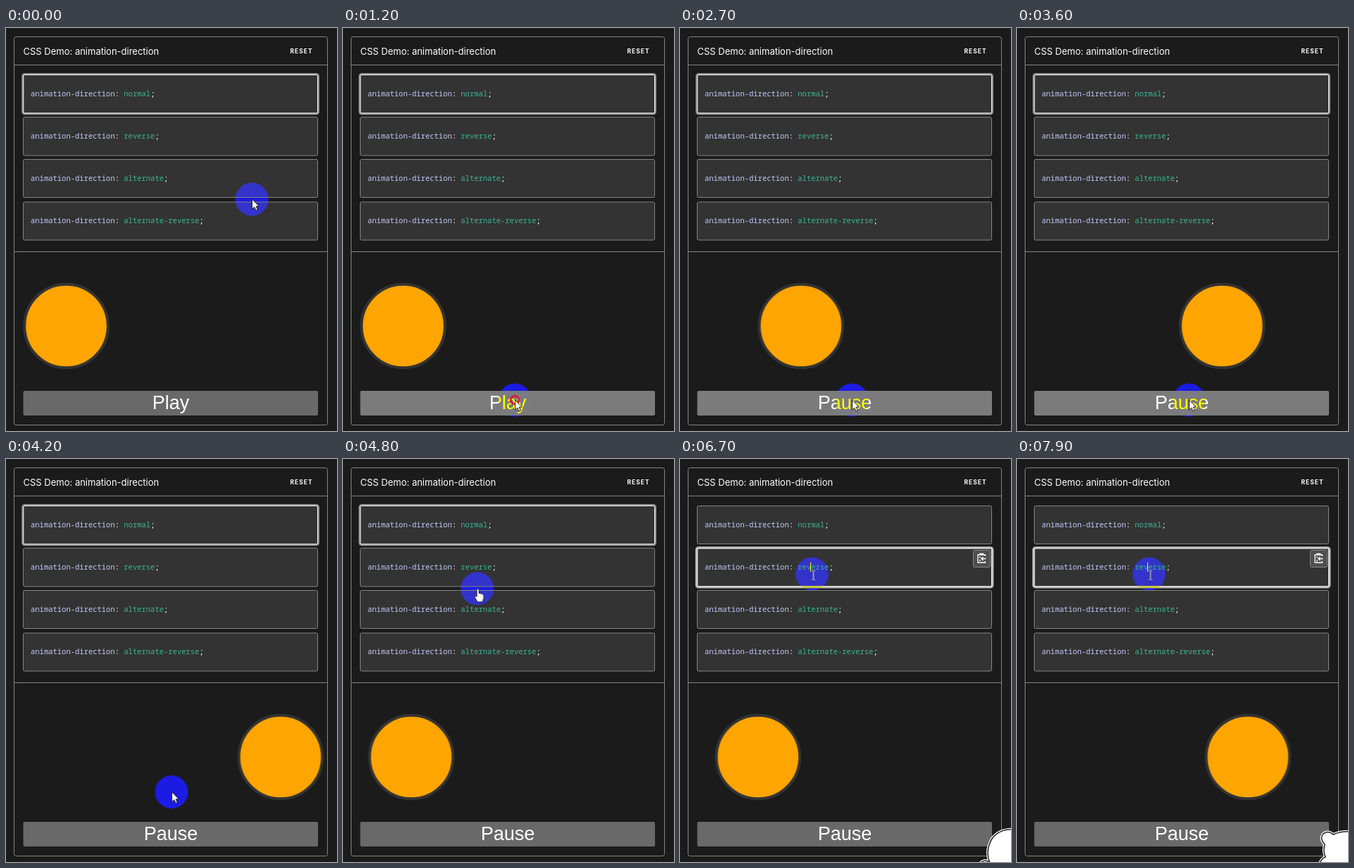
These frames come from a looping animation (470 px wide and 572 px high, 8000 ms). An HTML page:

```html
<!DOCTYPE html>
<html lang="en">
<head>
<meta charset="utf-8">
<title>animation-direction demo</title>
<style>
html, body { margin: 0; width: 100%; height: 100%; overflow: hidden; background: #1b1b1b; }
svg { display: block; width: 470px; height: 572px; }

.title { font: 13px Inter, sans-serif; fill: #fff; }
.reset { font: 700 8.4px Inter, sans-serif; letter-spacing: 1.1px; fill: #fff; }
.code { font: 10.5px "Noto Sans Mono", monospace; fill: #fff; white-space: pre; }
.prop { fill: #c5c8fb; }
.val { fill: #3ab891; }
.play { font: 27px "Liberation Sans", Arial, sans-serif; fill: #fff; text-anchor: middle; }
.line { fill: none; stroke: #858585; }
.choice { fill: #333; stroke: #858585; }
.glow { fill: none; stroke: #929292; stroke-width: 2.5; }
.edge { fill: #333; stroke: #fff; }
.bright { stroke: #bdbdbd; stroke-width: 3; }
.spot { fill: #00f; mix-blend-mode: difference; }

/* everything shares one 8 s clock */
.ball, .track, .hover, .before, .after, .idle, .playing,
.arrow, .hand, .press, .caret, .pet, .dome, .ears {
  animation: 8s linear infinite;
}
.hover, .before, .after, .idle, .playing, .arrow, .hand,
.press, .caret, .dome, .ears { animation-timing-function: step-end; }

/* ease-in slide of 3 s, flipped to reverse by the second click */
.ball { animation-name: slide; }
@keyframes slide {
  0% { transform: translateX(0); }
  17.1% { transform: translateX(0); animation-timing-function: cubic-bezier(.42, 0, 1, 1); }
  54.6% { transform: translateX(335px); animation-timing-function: step-end; }
  54.605% { transform: translateX(0); animation-timing-function: cubic-bezier(.315, 0, .66, .403); }
  67.61% { transform: translateX(56.2px); animation-timing-function: step-end; }
  67.615% { transform: translateX(165.5px); animation-timing-function: cubic-bezier(.302, .502, .681, 1); }
  92.1% { transform: translateX(0); animation-timing-function: step-end; }
  92.105% { transform: translateX(335px); animation-timing-function: cubic-bezier(0, 0, .397, .446); }
  100% { transform: translateX(226.5px); }
}

.track { animation-name: track; }
@keyframes track {
  0%, .6% { transform: translate(349px, 243px); animation-timing-function: ease-in-out; }
  11.3% { transform: translate(242px, 526px); }
  12.5% { transform: translate(244px, 528px); }
  49% { transform: translate(244px, 528px); animation-timing-function: cubic-bezier(.4, 0, .8, .8); }
  58.75% { transform: translate(195px, 226px); }
  60% { transform: translate(190.5px, 184px); animation-timing-function: ease-out; }
  63%, 100% { transform: translate(187.5px, 163px); }
}

.hover { animation-name: hover; }
@keyframes hover { 0%, 50.5%, 100% { fill: #696969; } 10% { fill: #7b7b7b; } }

.before { animation-name: before; }
@keyframes before { 0% { opacity: 1; } 67.61%, 100% { opacity: 0; } }
.after { animation-name: after; }
@keyframes after { 0% { opacity: 0; } 67.61%, 100% { opacity: 1; } }

.idle { animation-name: idle; }
@keyframes idle { 0% { opacity: 1; } 17.1%, 100% { opacity: 0; } }
.playing { animation-name: playing; }
@keyframes playing { 0% { opacity: 0; } 17.1%, 100% { opacity: 1; } }

.arrow { animation-name: arrow; }
@keyframes arrow { 0%, 4% { opacity: 1; } 1.5%, 56.8%, 100% { opacity: 0; } }
.hand { animation-name: hand; }
@keyframes hand { 0%, 4%, 67.61%, 100% { opacity: 0; } 1.5%, 56.8% { opacity: 1; } }

.press { animation-name: press; }
@keyframes press { 0%, 17%, 67.5%, 100% { opacity: 0; } 14.8%, 65.6% { opacity: 1; } }

.caret { animation-name: caret; }
@keyframes caret {
  0%, 74.2%, 87.4%, 100% { opacity: 0; }
  67.61%, 80.8%, 94% { opacity: 1; }
}

.pet { animation-name: rise; }
@keyframes rise {
  0%, 62% { transform: translateY(56px); animation-timing-function: ease-out; }
  70%, 100% { transform: none; }
}
.dome { animation-name: dome; }
@keyframes dome { 0% { opacity: 1; } 91%, 100% { opacity: 0; } }
.ears { animation-name: ears; }
@keyframes ears { 0% { opacity: 0; } 91%, 100% { opacity: 1; } }
</style>
</head>
<body>
<svg viewBox="0 0 470 572">
  <defs>
    <clipPath id="pane"><rect x="12" y="318" width="444" height="245"/></clipPath>
  </defs>
  <rect width="470" height="572" fill="#1b1b1b"/>
  <rect class="line" x="11.5" y="12.5" width="445" height="551" rx="3"/>
  <path class="line" d="M12 52.5H456M12 317.5H456"/>
  <text class="title" x="24.5" y="37.7">CSS Demo: animation-direction</text>
  <text class="reset" x="403.5" y="36">RESET</text>

  <rect class="choice" x="24.5" y="66.5" width="418" height="54" rx="2"/>
  <rect class="choice" x="24.5" y="126.5" width="418" height="54.5" rx="2"/>
  <rect class="choice" x="24.5" y="186.5" width="418" height="54" rx="2"/>
  <rect class="choice" x="24.5" y="247" width="418" height="54" rx="2"/>

  <g class="before">
    <rect class="glow" x="23.5" y="65.2" width="420.2" height="56.8" rx="3"/>
    <rect class="edge" x="24.8" y="66.5" width="417.7" height="54.3" rx="2"/>
  </g>
  <g class="after">
    <rect class="glow bright" x="23.3" y="125.7" width="420.6" height="56.3" rx="3"/>
    <rect class="edge" x="24.8" y="127" width="417.7" height="53.8" rx="2"/>
    <rect x="416.5" y="129.5" width="24" height="24" rx="2" fill="#4e4e4e" stroke="#858585"/>
    <path d="M433.5 138V136H423V147H433.5V145M426 136.5V134.5H430.5V136.5M434.5 141.5H428M430.5 139L428 141.5L430.5 144M425 139.5H427M425 144H427"
      fill="none" stroke="#fff" stroke-width="1.3"/>
  </g>

  <text class="code" x="35" y="96.7"><tspan class="prop">animation-direction</tspan>: <tspan class="val">normal</tspan>;</text>
  <text class="code" x="35" y="157"><tspan class="prop">animation-direction</tspan>: <tspan class="val">reverse</tspan>;</text>
  <text class="code" x="35" y="216.7"><tspan class="prop">animation-direction</tspan>: <tspan class="val">alternate</tspan>;</text>
  <text class="code" x="35" y="277"><tspan class="prop">animation-direction</tspan>: <tspan class="val">alternate-reverse</tspan>;</text>
  <path class="caret" d="M185.5 146.5V160" stroke="#fff"/>

  <g clip-path="url(#pane)">
    <circle class="ball" cx="85.5" cy="423" r="59.3" fill="#ffa500" stroke="#333" stroke-width="4"/>
  </g>

  <rect class="hover" x="24.5" y="515" width="418.5" height="35" rx="2" fill="#696969"/>
  <text class="play idle" x="234" y="541.3">Play</text>
  <text class="play playing" x="234" y="541.3">Pause</text>

  <circle class="spot track" r="23.5"/>
  <g class="track">
    <circle class="press" r="5.8" fill="none" stroke="#e8102a" stroke-width="2.6"/>
    <path class="arrow" d="M.5 0V14L3.7 11L6 16L8.3 15L6.1 10.1H10.3Z" fill="#fff" stroke="#111" stroke-width=".9"/>
    <path class="hand" d="M-.5 1.5Q1 -1 2.5 1.5V7Q4 5.8 5 7.3Q6.5 6.5 7.4 8Q9 7.5 9.2 9.5V14L7.5 19H.5L-3.5 12Q-3.8 9.8 -2 10.2L-.5 11.8Z"
      fill="#fff" stroke="#111" stroke-width=".9"/>
    <path class="after" d="M-.5 -4.5H1.2M2.8 -4.5H4.5M2 -4V8M-.5 8.5H1.2M2.8 8.5H4.5" fill="none" stroke="#d8d87c" stroke-width="1.2"/>
  </g>

  <g class="pet" fill="#fff" stroke-linejoin="round">
    <g class="dome">
      <path d="M424 576Q432 566 440 573Q433 556 443 539Q454 524 476 526V580H424Z" stroke="#fff" stroke-width="4"/>
      <path d="M424 576Q432 566 440 573Q433 556 443 539Q454 524 476 526V580H424Z" stroke="#222" stroke-width="1.5"/>
    </g>
    <g class="ears">
      <path d="M429 576Q432 567 438 565Q434 556 437 547Q430 540 434 533Q441 526 449 533Q460 528 476 529V580H429Z" stroke="#fff" stroke-width="4"/>
      <path d="M429 576Q432 567 438 565Q434 556 437 547Q430 540 434 533Q441 526 449 533Q460 528 476 529V580H429Z" stroke="#222" stroke-width="1.5"/>
    </g>
  </g>
</svg>
</body>
</html>
```
